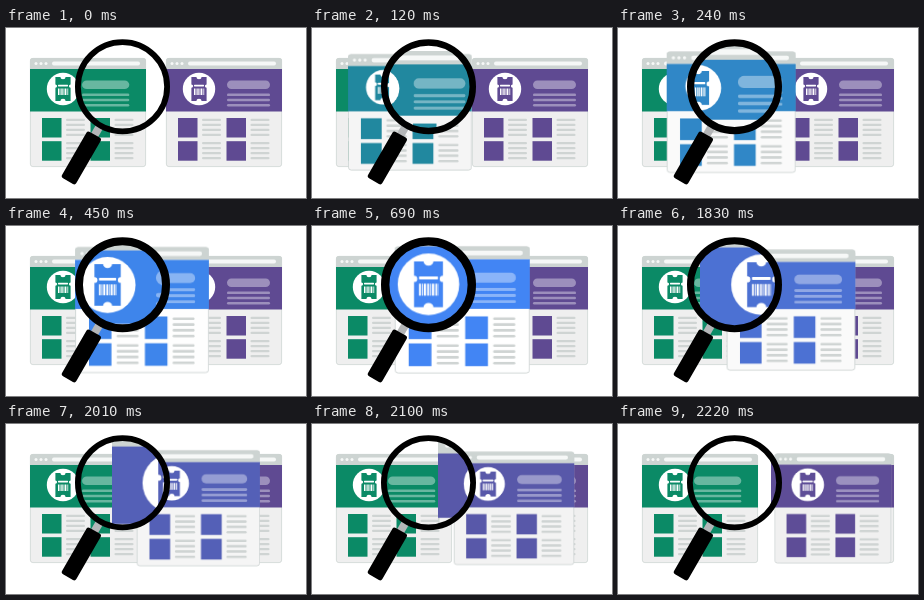
Write an HTML page that moves like this. It is 300x170 px and loops after 2250 ms.

```html
<!DOCTYPE html>
<html lang="en">
<head>
<meta charset="utf-8">
<title>Page comparison</title>
<style>
html, body { margin: 0; width: 100%; height: 100%; overflow: hidden; background: #fff; }
svg { display: block; width: 100%; height: 100%; }

.green { color: #0b8a66; fill: #efefef; }
.purple { color: #5f4a92; fill: #efefef; }

.show, .slide, .grow, .tint, .pan, .zoom, .ring {
  animation: 2250ms linear infinite;
}
.show { animation-name: show; }
.slide { animation-name: slide; }
.grow { animation-name: grow; }
.tint { animation-name: tint; }
.pan { animation-name: pan; }
.zoom { animation-name: zoom; }
.ring { animation-name: ring; fill: none; stroke: #000; }

@keyframes show {
  0% { opacity: 0; animation-timing-function: step-end; }
  .7%, 100% { opacity: 1; }
}
/* the travelling page: green slot, centre, purple slot */
@keyframes slide {
  0% { transform: translate(82px, 84.5px); animation-timing-function: cubic-bezier(.333, .44, .667, .92); }
  30.67%, 72% { transform: translate(150.3px, 84px); }
  72% { animation-timing-function: cubic-bezier(.333, .14, .667, .6); }
  100% { transform: translate(218px, 84.5px); }
}
@keyframes grow {
  0% { transform: scale(1); animation-timing-function: cubic-bezier(.333, .9, .667, 1); }
  30.67%, 72% { transform: scale(1.165); }
  72% { animation-timing-function: cubic-bezier(.333, 0, .667, .1); }
  100% { transform: scale(1); }
}
@keyframes tint {
  0% { color: #0b8a66; fill: #efefef; animation-timing-function: cubic-bezier(.333, .9, .667, 1); }
  30.67%, 72% { color: #4285f4; fill: #fff; }
  72% { animation-timing-function: cubic-bezier(.333, 0, .667, .1); }
  100% { color: #5f4a92; fill: #efefef; }
}
/* its enlarged view, placed by the badge centre */
@keyframes pan {
  0% { transform: translate(57px, 61px); animation-timing-function: cubic-bezier(.333, .3, .667, .9); }
  30.67%, 72% { transform: translate(116.5px, 58.3px); }
  89.33% { transform: translate(166px, 59px); }
  100% { transform: translate(193px, 61px); }
}
@keyframes zoom {
  0% { transform: scale(1); animation-timing-function: cubic-bezier(.333, .42, .667, .97); }
  30.67%, 72% { transform: scale(1.9); }
  89.33% { transform: scale(1.83); }
  100% { transform: scale(1); }
}
@keyframes ring {
  0% { r: 44.6px; stroke-width: 5.8px; animation-timing-function: ease-out; }
  30.67%, 72% { r: 43.3px; stroke-width: 8.4px; }
  89.33%, 100% { r: 44.6px; stroke-width: 5.8px; }
}
</style>
</head>
<body>
<svg viewBox="0 0 300 170">
  <defs>
    <clipPath id="glass"><circle cx="116.5" cy="58.7" r="43.5"/></clipPath>

    <g id="copy" fill="#cfd4d3">
      <rect width="19.5" height="19.5" fill="currentColor"/>
      <rect x="24" y=".8" width="19" height="2.3" rx="1.1"/>
      <rect x="24" y="5.8" width="19" height="2.3" rx="1.1"/>
      <rect x="24" y="10.8" width="19" height="2.3" rx="1.1"/>
      <rect x="24" y="15.8" width="19" height="2.3" rx="1.1"/>
    </g>

    <g id="ticket">
      <path fill="currentColor" d="M-7.6-12H-2.6A2.6 2.2 0 0 0 2.6-12H7.6V-4.6A1.7 1.7 0 0 0 7.6-1.2V12H2.6A2.6 2.2 0 0 0-2.6 12H-7.6V-1.2A1.7 1.7 0 0 0-7.6-4.6Z"/>
      <rect x="-5" y="-4.2" width="10" height="1.6" rx=".4" fill="#fff"/>
      <path stroke="#fff" stroke-width="6.4" stroke-dasharray="1 .5 .5 .5 1.2 .6" d="M-5 2.8H5.3"/>
    </g>

    <g id="intro" fill="#fff" fill-opacity=".38">
      <rect y="22.5" width="43" height="8.6" rx="4.3"/>
      <rect y="35.6" width="43" height="2.5" rx="1.2"/>
      <rect y="40.8" width="43" height="2.5" rx="1.2"/>
      <rect y="46" width="43" height="2.5" rx="1.2"/>
    </g>

    <!-- body fill and accent colour are inherited -->
    <g id="base">
      <rect x=".4" y=".4" width="115.2" height="108.2" rx="2.5" stroke="#cfd6d4" stroke-width=".8"/>
      <path fill="#cdd4d2" d="M0 11V2.5Q0 0 2.5 0H113.5Q116 0 116 2.5V11Z"/>
      <g fill="#f6f8f7">
        <circle cx="6" cy="5.6" r="1.5"/>
        <circle cx="11" cy="5.6" r="1.5"/>
        <circle cx="16" cy="5.6" r="1.5"/>
        <rect x="22" y="3.6" width="88" height="4" rx="2"/>
      </g>
      <rect y="11" width="116" height="42.5" fill="currentColor"/>
      <circle cx="33" cy="31" r="16.2" fill="#fff"/>
      <use href="#ticket" x="33" y="31"/>
      <use href="#copy" x="12" y="60"/>
      <use href="#copy" x="60.5" y="60"/>
      <use href="#copy" x="12" y="83.2"/>
      <use href="#copy" x="60.5" y="83.2"/>
    </g>
    <g id="page">
      <use href="#base"/>
      <use href="#intro" x="61"/>
    </g>
  </defs>

  <g class="green" transform="translate(24 30)">
    <use href="#base"/>
    <use href="#intro" transform="translate(52 0) scale(1.1 1)"/>
  </g>
  <use class="purple" href="#page" x="160" y="30"/>

  <g class="show">
    <g class="tint">
      <g class="slide"><g class="grow"><use href="#page" x="-58" y="-54.5"/></g></g>
      <g clip-path="url(#glass)">
        <g class="pan"><g class="zoom"><use href="#page" x="-33" y="-31"/></g></g>
      </g>
    </g>
  </g>

  <g transform="translate(116.5 58.7)">
    <g transform="rotate(30)">
      <rect x="-4" y="45" width="8" height="13" fill="#b4b6b8"/>
      <rect x="-8.2" y="55.5" width="16.4" height="53.5" rx="2.5"/>
    </g>
    <circle class="ring" r="44.6" stroke-width="5.8"/>
  </g>
</svg>
</body>
</html>
```
